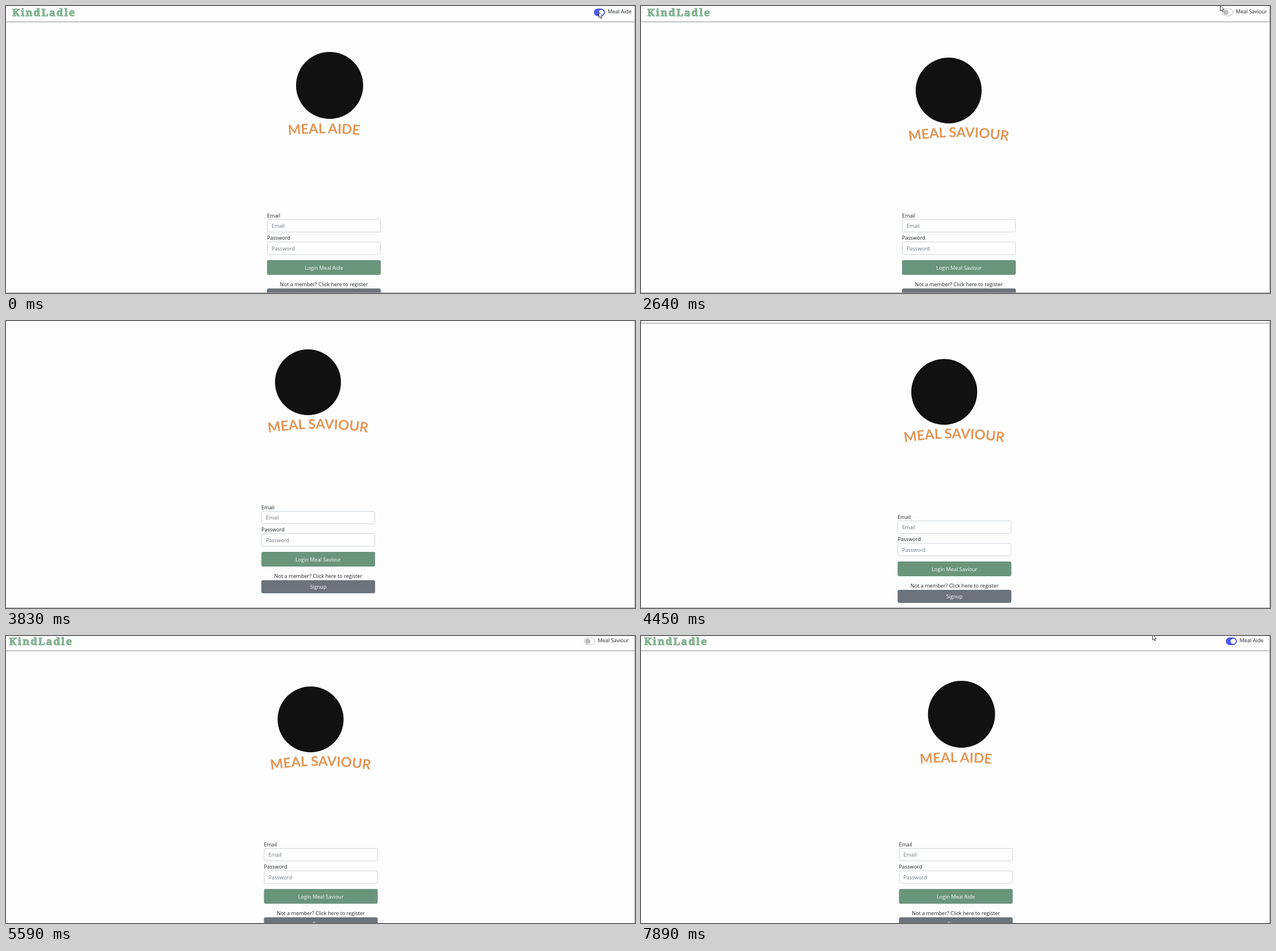
Write an HTML page that moves like this. It is 1106 by 506 pixels and loops after 8 s.

```html
<!DOCTYPE html>
<html lang="en">
<head>
<meta charset="utf-8">
<title>Login role switch</title>
<style>
  html, body { margin: 0; height: 100%; overflow: hidden; background: #fdfdfd; }
  svg { display: block; width: 100vw; height: 100vh; }
  text { font: 9.1px "Open Sans", "Noto Sans", sans-serif; fill: #212529; }
  .middle { text-anchor: middle; }
  .light { fill: #fff; }
  .hint { fill: #6c757d; }
  .field { fill: #fff; stroke: #ced4da; }
  .brand { font: 900 18px "Noto Serif", serif; letter-spacing: 2px; fill: #8fbb9c; stroke: #5c9670; stroke-width: .7; }
  .arch { font: 700 24px Lato, "Open Sans", sans-serif; fill: #e39554; text-anchor: middle; }
</style>
</head>
<body>
<svg viewBox="0 0 1106 506">
  <defs>
    <path id="aideArc" d="M489 228Q559 221 629 228"/>
    <path id="saviourArc" d="M458 240Q558.5 222 659 240"/>
  </defs>
  <g id="page">
    <text class="brand" x="11" y="17.5">KindLadle</text>
    <rect x="-20" y="27.3" width="1150" height="1.4" fill="#aaa"/>

    <g id="switch">
      <rect id="ring" x="-2.5" y="2.5" width="24" height="18" rx="9" fill="#c9cdff"/>
      <rect id="track" x=".5" y="5" width="18.5" height="12.5" rx="6.25"/>
      <circle id="knob" cy="11.25" r="4.6"/>
    </g>
    <text id="role" y="13"></text>

    <g id="aide">
      <circle cx="569" cy="140" r="59" fill="#111"/>
      <text class="arch"><textPath href="#aideArc" startOffset="50%">MEAL AIDE</textPath></text>
    </g>
    <g id="saviour">
      <circle cx="541" cy="149" r="58" fill="#111"/>
      <text class="arch"><textPath href="#saviourArc" startOffset="50%">MEAL SAVIOUR</textPath></text>
    </g>

    <text x="459" y="373">Email</text>
    <rect class="field" x="459.5" y="376.5" width="199" height="22" rx="2.5"/>
    <text class="hint" x="467" y="391.3">Email</text>
    <text x="459" y="412">Password</text>
    <rect class="field" x="459.5" y="416" width="199" height="22" rx="2.5"/>
    <text class="hint" x="467" y="430.5">Password</text>
    <rect x="459" y="448" width="200" height="26" rx="3" fill="#6a957d"/>
    <text id="login" class="middle light" x="559" y="464.5"></text>
    <text class="middle" x="559" y="494">Not a member? Click here to register</text>
    <rect x="459" y="498" width="200" height="23" rx="3" fill="#6c737c"/>
    <text class="middle light" x="559" y="512.8">Signup</text>
  </g>
  <rect x="1105" width="1" height="506" fill="#a8a8a8"/>
  <rect id="floor" y="505" width="1106" height="1" fill="#a8a8a8"/>
  <path id="cursor" d="M0 0V9.5L2.2 7.6 3.7 11 5.2 10.4 3.8 7.1H6.7Z" fill="#fff" stroke="#111" stroke-width=".8"/>
</svg>
<script>
const LOOP = 8000, STEP = 122;
const SWITCH_OFF = 940, FOCUS = 6550, SWITCH_ON = 7140;
const SCROLL_DOWN = 3440, SCROLL_END = 3830, SCROLL_BACK = 5060;
const POINTER_LEAVES = 2780, POINTER_RETURNS = 5970;

const $ = id => document.getElementById(id);
const set = (id, attrs) => {
  for (const name in attrs) $(id).setAttribute(name, attrs[name]);
};
const move = (id, [x, y]) => set(id, { transform: `translate(${x} ${y})` });
const show = (id, visible) => set(id, { visibility: visible ? "visible" : "hidden" });
const clamp = k => Math.min(1, Math.max(0, k));
const lerp = (a, b, k) => a.map((v, i) => v + (b[i] - v) * k);
const mix = (a, b, k) => `rgb(${lerp(a, b, k)})`;

const ramp = (t, start) => clamp(Math.floor((t - start) / STEP + 1) / 2);

// Moves in steps of STEP through key points { t, at }.
function travel(points, t) {
  const next = points.findIndex(p => p.t > t);
  if (next === 0) return points[0].at;
  if (next < 0) return points.at(-1).at;
  const a = points[next - 1], b = points[next];
  const elapsed = Math.floor((t - a.t) / STEP) * STEP;
  return lerp(a.at, b.at, elapsed / (b.t - a.t));
}

const bottom = [-10, -41];
const scroll = [
  { t: SCROLL_DOWN - STEP, at: [0, 0] },
  { t: SCROLL_DOWN, at: [.7, -4.2] },
  { t: SCROLL_END, at: bottom },
  { t: 4450 - 2 * STEP, at: bottom },
  { t: 4450, at: [-7.8, -24] },
  { t: 4940, at: [-6, -9] },
  { t: SCROLL_BACK, at: [-5.4, -2] }
];
const overSwitch = [1023.5, 9.5];
const pointer = [
  { t: 2640 - STEP, at: [1042.5, 11] },
  { t: 2640, at: [1018.5, -1] },
  { t: POINTER_RETURNS, at: [1033.5, 8.5] },
  { t: 6120, at: overSwitch },
  { t: 7520 - STEP, at: overSwitch },
  { t: 7886, at: [899.5, -2.5] }
];

function draw(t) {
  const isAide = t < SWITCH_OFF || t >= SWITCH_ON;
  const name = isAide ? "Meal Aide" : "Meal Saviour";
  const on = 1 - ramp(t, SWITCH_OFF) + ramp(t, SWITCH_ON);
  const glow = ramp(t, FOCUS) - ramp(t, SWITCH_ON);

  move("page", travel(scroll, t));
  move("cursor", travel(pointer, t));
  move("switch", [isAide ? 1033.7 : 1021.8, 0]);
  show("cursor", t < POINTER_LEAVES || t >= POINTER_RETURNS);
  show("aide", isAide);
  show("saviour", !isAide);
  show("floor", t < SCROLL_DOWN || (t >= SCROLL_END && t < SCROLL_BACK));

  set("ring", { opacity: glow });
  set("track", {
    fill: mix([255, 255, 255], [74, 86, 242], on),
    stroke: on === 1 ? "#4a56f2" : glow ? "#a5abff" : "#bfbfbf"
  });
  set("knob", {
    cx: 6.6 + 6.4 * on,
    fill: on ? "#fff" : mix([188, 188, 188], [138, 147, 250], glow)
  });
  $("role").textContent = name;
  set("role", { x: isAide ? 1058 : 1046 });
  $("login").textContent = "Login " + name;
}

function tick(now) {
  draw(now % LOOP);
  requestAnimationFrame(tick);
}
draw(0);
requestAnimationFrame(tick);
</script>
</body>
</html>
```
